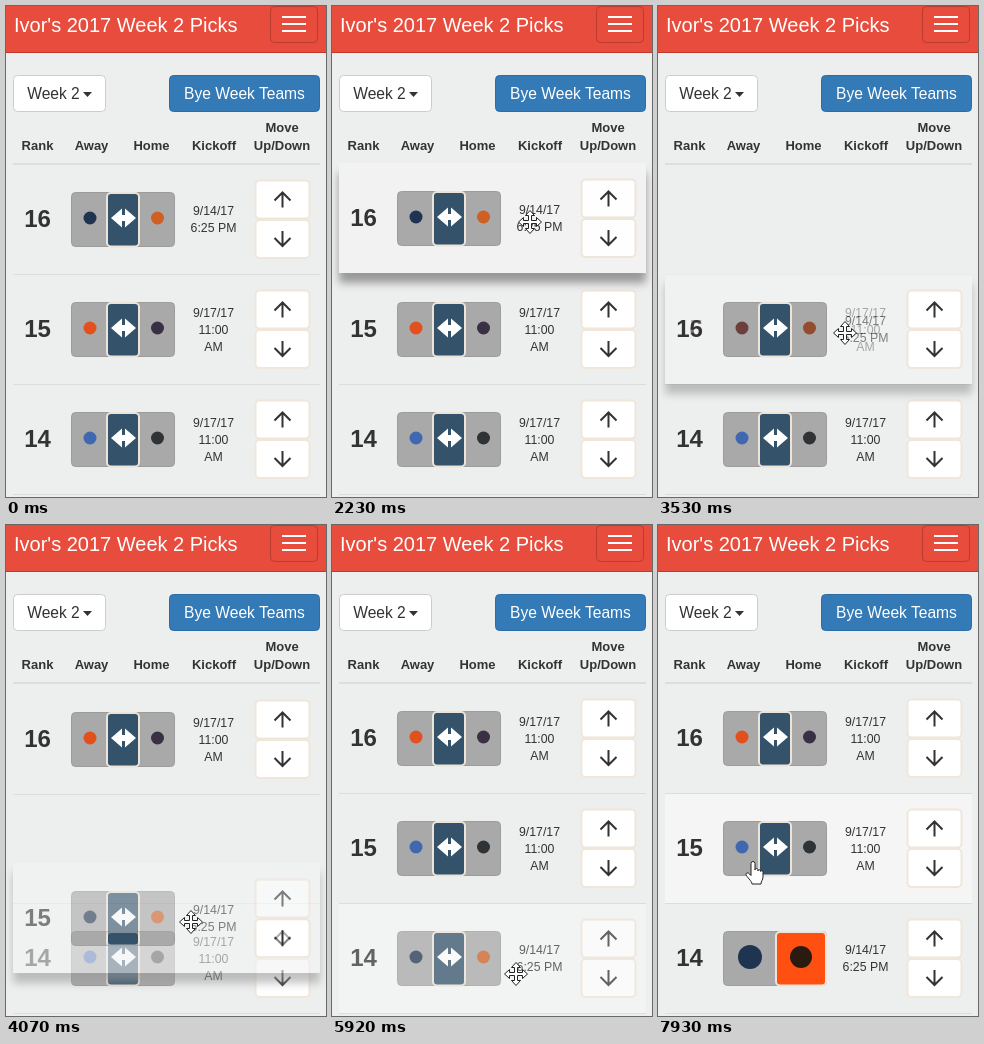
An HTML page that plays this animation: 320x491 px, repeating every 8 s.

```html
<!DOCTYPE html>
<html lang="en">
<head>
<meta charset="utf-8">
<title>Week 2 Picks</title>
<style>
  html, body { margin: 0; width: 100%; height: 100%; overflow: hidden; background: #edeeee; }
  svg { display: block; font-family: "Liberation Sans", Arial, sans-serif; fill: #333; }
  .label { font-size: 15.6px; text-anchor: middle; }
  .head { font-weight: bold; font-size: 13px; text-anchor: middle; }
  .rank { font-weight: bold; font-size: 24px; text-anchor: middle; }
  .time { font-size: 12.3px; text-anchor: middle; }
  .button { fill: #fff; stroke: #f0e6da; stroke-width: 2; }
  .arrow { fill: none; stroke: #333; stroke-width: 2; }
  .lift { fill: #f3f3f3; filter: drop-shadow(0 10px 4px #999); }
  .cursor path { fill: #fff; stroke: #222; }
</style>
</head>
<body>
<svg id="stage" width="320" height="491" viewBox="0 0 320 491"></svg>
<script>
const LOOP = 8000, TOP = 158, SLOT = 110;
const PICK = 2230, SWAP_1 = 3690, SWAP_2 = 4930, RELEASE = 5390, DROP = 5850, CHOOSE = 7120;

// time, x, y of the pointer's hot spot
const PATH = [
  [450, 245, 468], [700, 224, 375], [1000, 203, 268], [1220, 199, 236], [1520, 198, 216],
  [PICK, 198, 216], [2500, 197, 225], [2920, 193, 255], [3530, 187, 327], [3840, 186, 381],
  [4300, 185, 412], [4770, 184, 434], [5080, 184, 449], [6240, 184, 449],
  [6460, 167, 439], [6610, 162, 437], [7480, 162, 437], [7930, 95, 337]
];

const GAMES = [
  { away: '#1f3450', home: '#cf5f22', kickoff: ['9/14/17', '6:25 PM'] },
  { away: '#e2501e', home: '#3a3044', kickoff: ['9/17/17', '11:00', 'AM'] },
  { away: '#3f68b0', home: '#2f3336', kickoff: ['9/17/17', '11:00', 'AM'] }
];

const clamp = v => Math.min(1, Math.max(0, v));
const ease = v => v * v * (3 - 2 * v);
const mix = (a, b, p) => a + (b - a) * p;
const mixColor = (a, b, p) => `rgb(${a.map((v, i) => Math.round(mix(v, b[i], p)))})`;

function pointAt(t) {
  const i = PATH.findIndex(key => key[0] > t);
  if (i < 1) return PATH.at(i).slice(1);
  const [a, b] = [PATH[i - 1], PATH[i]], p = (t - a[0]) / (b[0] - a[0]);
  return [mix(a[1], b[1], p), mix(a[2], b[2], p)];
}

const text = (cls, x, y, str) => `<text class="${cls}" x="${x}" y="${y}">${str}</text>`;
const rule = (y, h) => `<rect x="7" y="${y}" width="307" height="${h}" fill="#ddd"/>`;

const moveButton = (y, dir) => `
  <rect class="button" x="249.5" y="${y - 19}" width="54" height="38" rx="4"/>
  <path class="arrow" d="M276.5 ${y + 8 * dir}V${y - 7 * dir}M268.5 ${y + dir}l8 ${-8 * dir}l8 ${8 * dir}"/>`;

const row = ({ away, home, kickoff }, i) => `<g class="row">
  ${i ? '' : '<rect class="lift" x="7" width="307" height="110"/>'}
  <rect class="hover" x="7" y="1" width="307" height="109" fill="#f5f5f5"/>
  ${text('rank', 31.5, 63, '')}
  <rect x="65.5" y="28.5" width="103" height="54" rx="4" fill="#a9a9a9" stroke="#9c9c9c"/>
  <rect class="panel" x="101" y="29" width="32" height="53.5" rx="4" fill="#34536b" stroke="#ece4d8" stroke-width="2"/>
  <path class="swap" fill="#fff" d="M105 54l11-9.5v6.5h3v-6.5l11 9.5l-11 9.5v-6.5h-3v6.5z"/>
  <circle class="away" cx="84" cy="54" r="6.5" fill="${away}"/>
  <circle class="home" cx="151.5" cy="54" r="6.5" fill="${home}"/>
  ${kickoff.map((s, n) => text('time', 207.5, 59.5 + 17 * (n - kickoff.length / 2 + .5), s)).join('')}
  ${moveButton(35.5, 1)}${moveButton(75, -1)}
</g>`;

const stage = document.getElementById('stage');
stage.innerHTML = `
  <rect width="320" height="46" fill="#e74c3c"/>
  <rect y="46" width="320" height="1" fill="#c0392b"/>
  <text x="8" y="26" font-size="20" fill="#fff">Ivor's 2017 Week 2 Picks</text>
  <rect x="264.5" y=".5" width="47" height="36" rx="4" fill="none" stroke="#b93c30"/>
  <path d="M276 11h24m-24 7h24m-24 7h24" stroke="#fff" stroke-width="2"/>
  <rect x="7.5" y="69.5" width="92" height="36" rx="4" fill="#fff" stroke="#ccc"/>
  ${text('label', 47.5, 93, 'Week 2')}
  <path d="M77 86h9l-4.5 5z"/>
  <rect x="163.5" y="69.5" width="150" height="36" rx="4" fill="#337ab7" stroke="#2e6da4"/>
  <g fill="#fff">${text('label', 238.5, 93, 'Bye Week Teams')}</g>
  ${[['Rank', 31.5], ['Away', 85.5], ['Home', 145.5], ['Kickoff', 208], ['Up/Down', 276]]
    .map(([s, x]) => text('head', x, 144, s)).join('')}
  ${text('head', 276, 126, 'Move')}
  ${rule(157, 2)}<g id="line">${rule(268, 1)}</g>${rule(378, 1)}${rule(488, 1)}
  ${GAMES.map(row).reverse().join('')}
  <g class="cursor">
    <path id="move" d="M0-11.5l4.5 5H1.5V-1.5H6.5V-4.5L11.5 0L6.5 4.5V1.5H1.5V6.5H4.5L0 11.5L-4.5 6.5H-1.5V1.5H-6.5V4.5L-11.5 0L-6.5-4.5V-1.5H-1.5V-6.5H-4.5z"/>
    <path id="hand" d="M-2 13.5V1.5a2 2 0 0 1 4 0V8c0-2 3-2 3 0v1c0-2 2.7-1.5 2.7.5c0-1.5 2.3-1 2.3 1V15c0 3-2 4-2 7H-1c0-3-5.5-7-6-9.5c0-2 2.5-2 3.5-.5z"/>
  </g>`;

const rows = [...stage.querySelectorAll('.row')].reverse();
const cursor = stage.querySelector('.cursor');
const set = (el, attrs) => { for (const k in attrs) el.setAttribute(k, attrs[k]); };
const show = (el, on) => set(el, { visibility: on ? 'visible' : 'hidden' });

function drawChoice(p) {
  const part = name => rows[0].querySelector('.' + name);
  set(part('panel'), {
    x: mix(101, 118, p), width: mix(32, 50, p),
    fill: mixColor([52, 83, 107], [255, 80, 18], p)
  });
  set(part('swap'), { opacity: 1 - p });
  set(part('away'), { cx: mix(84, 92, p), r: mix(6.5, 12, p) });
  set(part('home'), {
    cx: mix(151.5, 143, p), r: mix(6.5, 11, p),
    fill: mixColor([207, 95, 34], [43, 26, 16], p)
  });
}

function draw(t) {
  const [x, y] = pointAt(t);
  const dragging = t >= PICK && t < DROP;
  const nudge = t >= SWAP_1 && t < DROP ? 1 : 0;
  const slots = [
    t < SWAP_1 ? 0 : t < SWAP_2 ? 1 : 2,
    t < SWAP_1 ? 1 : 0,
    t < SWAP_2 ? 2 : 1
  ];
  const hovered = t >= 450 && !dragging ? Math.floor((y - TOP) / SLOT) : -1;

  rows.forEach((el, i) => {
    let offset = slots[i] * SLOT + (slots[i] === 0 ? nudge : 0);
    if (i === 0 && dragging)
      offset = Math.round(mix(y - 217, 2 * SLOT, ease(clamp((t - RELEASE) / (DROP - RELEASE)))));
    set(el, { transform: `translate(0 ${TOP + offset})` });
    el.querySelector('.rank').textContent = 16 - slots[i];
    show(el.querySelector('.hover'), hovered === slots[i]);
  });
  set(document.getElementById('line'), { transform: `translate(0 ${nudge})` });

  const fade = clamp((t - PICK) / 200) - clamp((t - DROP) / 200);
  set(rows[0], { opacity: 1 - .4 * fade });
  show(rows[0].querySelector('.lift'), dragging);
  drawChoice(ease(clamp((t - CHOOSE) / 190)));

  const inRow = (y - TOP) % SLOT;
  const pointing = !dragging && x > 65 && x < 169 && inRow > 28 && inRow < 83;
  set(cursor, {
    transform: `translate(${Math.round(x)} ${Math.round(y)})`,
    display: t < 450 ? 'none' : 'inline'
  });
  show(document.getElementById('move'), !pointing);
  show(document.getElementById('hand'), pointing);
}

const start = performance.now();
function tick() {
  draw((performance.now() - start) % LOOP);
  requestAnimationFrame(tick);
}
tick();
</script>
</body>
</html>
```
